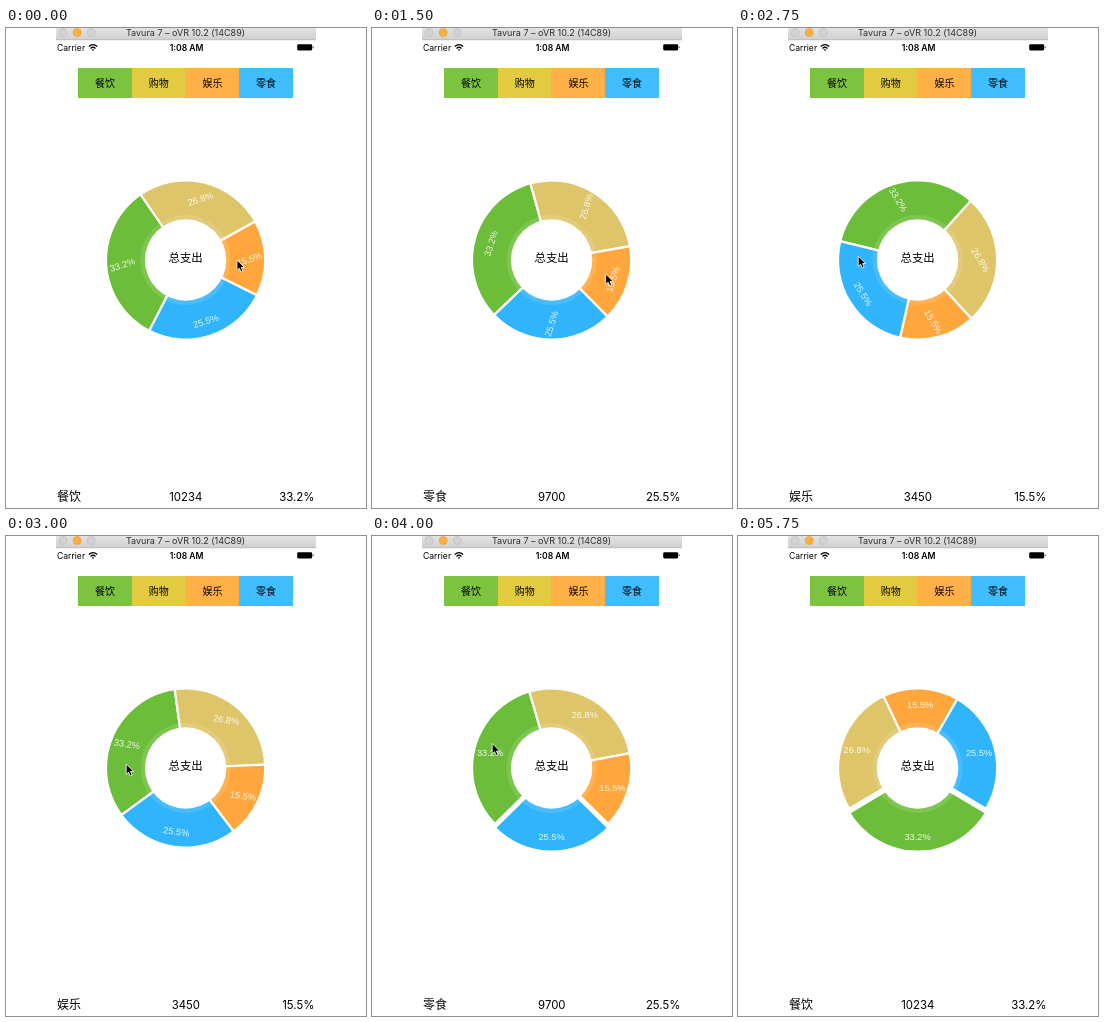
Animation, 360 px wide and 480 px high, one loop 6 s. Source, as an HTML page:

```html
<!DOCTYPE html>
<html lang="zh-CN">
<head>
<meta charset="utf-8">
<title>总支出</title>
<style>
  html, body { margin: 0; width: 100%; height: 100%; overflow: hidden; background: #fff; }
  svg { display: block; width: 100vw; height: 100vh; }
  text { font-family: Inter, "Noto Sans CJK SC", "Noto Sans CJK", sans-serif; }
  .mid { text-anchor: middle; }
  .end { text-anchor: end; }
  .status { font-size: 8.6px; }
  .key { font-size: 10px; }
  .footer { font-size: 11.4px; }
  .share { font: 9.3px "Liberation Sans", sans-serif; fill: #fff; fill-opacity: .88; text-anchor: middle; }
</style>
</head>
<body>
<svg viewBox="0 0 360 480">
  <defs>
    <linearGradient id="bar" x2="0" y2="1">
      <stop stop-color="#e4e3e4"/><stop offset="1" stop-color="#d0cfd0"/>
    </linearGradient>
  </defs>

  <rect x="50" width="260" height="12" fill="url(#bar)"/>
  <path d="M50 11.8H310" stroke="#b4b3b4" stroke-width=".7"/>
  <g stroke-width=".6">
    <circle cx="57" cy="4.6" r="4" fill="#d3d2d3" stroke="#bcbbbc"/>
    <circle cx="71.2" cy="4.6" r="4" fill="#fcb040" stroke="#e09c34"/>
    <circle cx="85.3" cy="4.6" r="4" fill="#d3d2d3" stroke="#bcbbbc"/>
  </g>
  <text class="mid" x="179.5" y="8" font-size="9" fill="#2e2e2e">Tavura 7 – oVR 10.2 (14C89)</text>

  <text class="status" x="51" y="22.6">Carrier</text>
  <g fill="none" stroke="#000" stroke-width="1.3">
    <path d="M82.8 18.5Q87 14.8 91.2 18.5M84.5 20.4Q87 18.2 89.5 20.4"/>
    <path d="M87 23L85.7 21.7Q87 20.6 88.3 21.7Z" fill="#000" stroke="none"/>
  </g>
  <text class="status mid" x="180.6" y="22.6" font-weight="600">1:08 AM</text>
  <rect x="291.2" y="16.2" width="15" height="6.2" rx="1.3"/>
  <path d="M306.9 18.1Q308.6 19.3 306.9 20.5Z"/>

  <g id="legend"></g>
  <g id="wheel"></g>
  <circle cx="179.6" cy="232" r="45" fill="#fff" fill-opacity=".12"/>
  <circle cx="179.6" cy="232" r="40.7" fill="#fff"/>
  <text class="mid" x="179.6" y="234.3" font-size="11.4">总支出</text>

  <g class="footer">
    <text id="name" x="51" y="472.5" font-size="12"></text>
    <text id="amount" class="mid" x="179.8" y="472.5"></text>
    <text id="percent" class="end" x="308.4" y="472.5"></text>
  </g>
  <path id="cursor" d="M0 0V10.4L2.4 8.2L4 12L5.9 11.2L4.3 7.5H7.5Z" stroke="#fff" stroke-width=".8"/>
</svg>
<script>
const LOOP = 6000, STEP = 250, SPIN = 500, POP = 300, POP_DISTANCE = 4;
const CX = 179.6, CY = 232, RADIUS = 78.5, LABEL_RADIUS = 63.6;

const items = [
  { name: '餐饮', amount: 10234, share: 33.2, color: '#6cbd39', key: '#7cc440' },
  { name: '购物', amount: 7300, share: 26.8, color: '#dec56a', key: '#e2cb40' },
  { name: '娱乐', amount: 3450, share: 15.5, color: '#ffa73c', key: '#ffb046' },
  { name: '零食', amount: 9700, share: 25.5, color: '#30b4fc', key: '#3fbdff' }
];
const total = items.reduce((sum, item) => sum + item.share, 0);

// Each tap turns the chosen slice to the bottom, then pushes it out.
const moves = [
  { start: -367, from: 0, to: 3 },
  { start: 1470, from: 3, to: 2 },
  { start: 2605, from: 2, to: 3 },
  { start: 4005, from: 3, to: 0, spin: 400 }
];
const cursorStops = [
  [0, 231, 232], [500, 233.7, 246], [2000, 183, 229],
  [2500, 120.2, 228], [3750, 120.2, 207.5], [5000, 260.5, 87], [5250, -50, -50]
];

const $ = id => document.getElementById(id);
const rad = deg => deg * Math.PI / 180;
const ease = p => { p = Math.min(1, Math.max(0, p)); return p * p * (3 - 2 * p); };
const latest = (list, test) => list.filter(test).pop();
const percent = item => item.share + '%';

function add(parent, tag, attrs, content = '') {
  const el = document.createElementNS('http://www.w3.org/2000/svg', tag);
  for (const k in attrs) el.setAttribute(k, attrs[k]);
  el.textContent = content;
  return parent.appendChild(el);
}

let angle = 0;
items.forEach((item, i) => {
  const x = 72 + i * 53.7;
  add($('legend'), 'rect', {
    x, y: 39.6, width: 53.7, height: 30.8, fill: item.key, 'shape-rendering': 'crispEdges'
  });
  add($('legend'), 'text', { class: 'key mid', x: x + 27, y: 58.8 }, item.name);

  const sweep = item.share / total * 360;
  item.middle = angle + sweep / 2;
  angle += sweep;
  const px = RADIUS * Math.cos(rad(sweep / 2)), py = RADIUS * Math.sin(rad(sweep / 2));
  item.group = add($('wheel'), 'g', {});
  item.wedge = add(item.group, 'g', {});
  add(item.wedge, 'path', { d: `M0 0L${px} ${-py}A${RADIUS} ${RADIUS} 0 0 1 ${px} ${py}Z`, fill: item.color });
  add(item.wedge, 'path', {
    d: `M${px * 1.02} ${-py * 1.02}L0 0L${px * 1.02} ${py * 1.02}`,
    fill: 'none', stroke: '#fff', 'stroke-width': 2.2
  });
});
items.forEach(item => {
  item.text = add(item.group, 'text', { class: 'share' }, percent(item));
});

function render(time) {
  const t = Math.floor(time % LOOP / STEP) * STEP;
  const move = latest(moves, m => m.start <= t);
  const spin = move.spin || SPIN;
  const elapsed = t - move.start;
  const turn = ((items[move.to].middle - items[move.from].middle + 540) % 360) - 180;
  const tilt = turn * (1 - ease(elapsed / spin));
  const pop = POP_DISTANCE * ease((elapsed - spin) / POP);

  $('wheel').setAttribute('transform', `translate(${CX} ${CY}) rotate(${tilt})`);
  items.forEach((item, i) => {
    const rest = 90 + item.middle - items[move.to].middle;
    item.group.setAttribute('transform', `translate(0 ${i === move.to ? pop : 0})`);
    item.wedge.setAttribute('transform', `rotate(${rest})`);
    item.text.setAttribute('x', LABEL_RADIUS * Math.cos(rad(rest)));
    item.text.setAttribute('y', LABEL_RADIUS * Math.sin(rad(rest)) + 4);
  });

  const shown = items[elapsed >= spin ? move.to : move.from];
  $('name').textContent = shown.name;
  $('amount').textContent = shown.amount;
  $('percent').textContent = percent(shown);

  const [, x, y] = latest(cursorStops, s => s[0] <= t);
  $('cursor').setAttribute('transform', `translate(${x} ${y})`);
}

const origin = performance.now();
function tick() {
  render(performance.now() - origin);
  requestAnimationFrame(tick);
}
tick();
</script>
</body>
</html>
```
